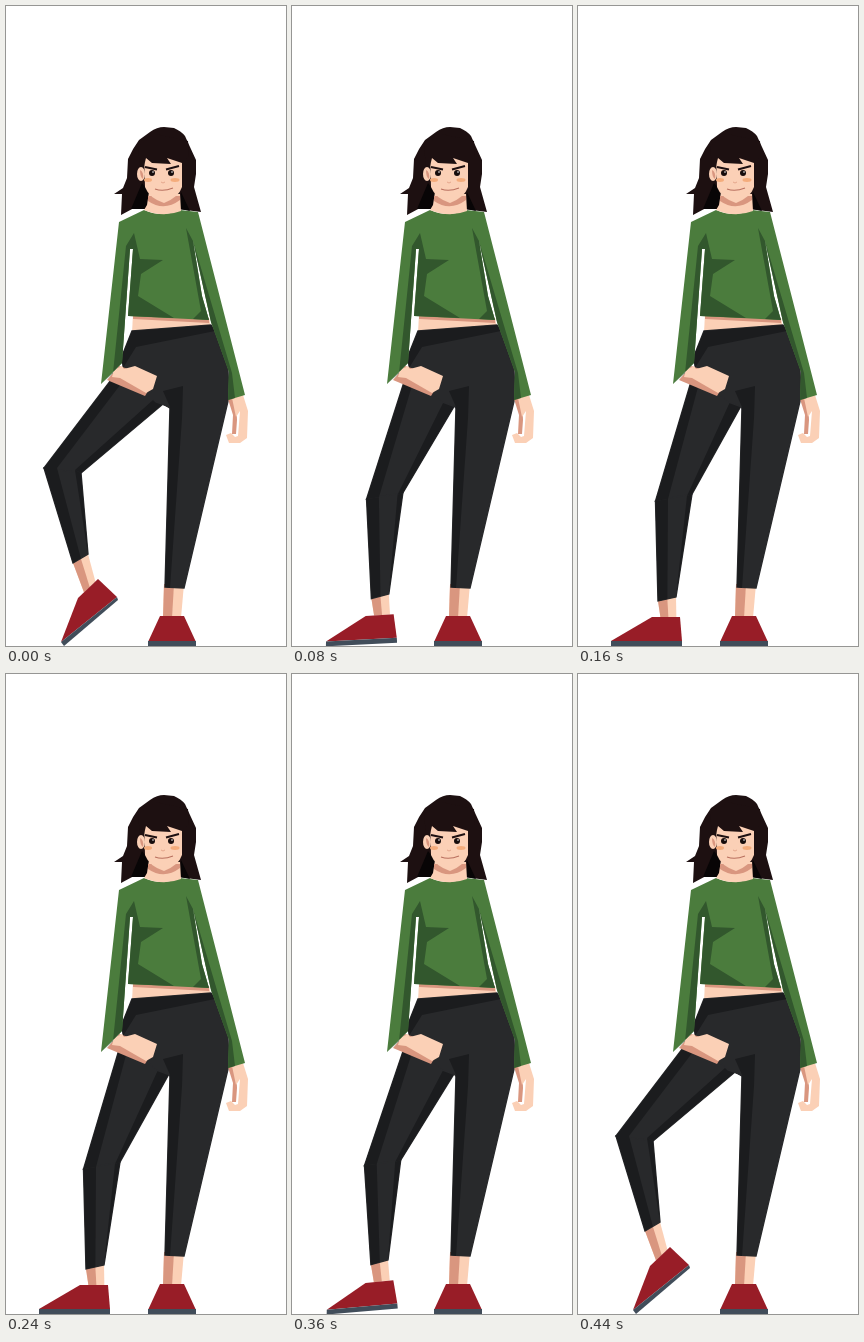
Recreate the animation shown at these times as an HTML page. Size 280 by 640 pixels, loop 480 ms.

```html
<!DOCTYPE html>
<html lang="en">
<head>
<meta charset="utf-8">
<title>Tapping foot</title>
<style>
html, body { margin: 0; width: 100%; height: 100%; overflow: hidden; background: #fff; }
svg { display: block; }
.skin { fill: #fbd0b6; }
.tan { fill: #d9967f; }
.pants { fill: #28292b; stroke: #28292b; stroke-width: 1.4; }
.shade { fill: #1b1c1e; }
.knit { fill: #4b7c3d; }
.fold { fill: #32572d; }
.hair { fill: #1d1011; }
.deep { fill: #080506; }
.shoe { fill: #981d27; }
.sole { fill: #414d5a; }
</style>
</head>
<body>
<svg width="280" height="640" viewBox="0 0 280 640">
  <!-- standing leg -->
  <path class="skin" d="M158 578H178L175 612H157Z"/>
  <path class="tan" d="M158 578H168L166 612H157Z"/>
  <path class="shoe" d="M142 636L154 610H178L190 636Z"/>
  <path class="sole" d="M142 635H190V640H142Z"/>

  <!-- waist -->
  <path class="skin" d="M127 309L203 312L205 321L126 326Z"/>
  <path class="tan" d="M127 309L203 312V317L127 313Z"/>

  <g id="leg"></g>

  <!-- trousers -->
  <path class="pants" d="M126 325L205 319L209 325L222 364L223 391L178 582L159 581L164 401L150 396L118 366L116 350Z"/>
  <path class="shade" d="M126 325L205 319L209 325L130 341L117 362L115 352Z"/>
  <path class="shade" d="M177 380L176 412L164 582L159 581L164 401L157 385Z"/>

  <!-- far hand -->
  <path class="tan" d="M222 393L230 391L231 414L230 428L226 428L227 409Z"/>
  <path class="skin" d="M226 392L237 389L242 405L241 432L234 437L223 437L220 429L225 427L229 431L232 430L234 405L230 411Z"/>

  <!-- near hand -->
  <path class="tan" d="M101 374L113 360L150 372L139 390Z"/>
  <path class="skin" d="M108 364L116 360L118 363L129 360L151 370L147 383L140 387L114 372L106 371Z"/>

  <!-- hair behind the face -->
  <path class="hair" d="M158 121L168 122Q175 125 179 130L184 141L190 154L190 168L188 181L195 206L172 203L140 203L128 202L115 209L116 188L108 188L117 182L121 172L122 153Q127 142 133 134L144 126Q151 121 158 121Z"/>
  <path class="deep" d="M136 177L125 203L140 203L143 186Z"/>
  <path class="deep" d="M175 186L184 205L174 203Z"/>

  <!-- sweater -->
  <path class="knit" d="M138 204Q155 212 174 204L192 206L239 389L222 394L223 366L205 316L187 235L196 290L203 314L122 310L127 243L124 243L116 357L95 378L113 216Z"/>
  <path class="fold" d="M128 227L134 253L157 254L135 268L132 290L168 312L122 310L127 243L124 243L116 357L95 378L107 367L120 240Z"/>
  <path class="fold" d="M180 222L195 305L187 313L203 314L196 290L187 235Z"/>
  <path class="fold" d="M187 235L226 367L229 392L222 394L223 366L205 316Z"/>

  <!-- neck and face -->
  <path class="skin" d="M143 186L174 188L175 205Q157 212 138 204L141 199Z"/>
  <path class="tan" d="M142 190L174 190V194Q158 206 142 195Z"/>
  <ellipse class="skin" cx="135" cy="168" rx="4" ry="7"/>
  <path class="tan" d="M134 164Q138 166 137 173Q134 171 134 164Z"/>
  <path class="skin" d="M138 148H176V181Q173 191 158 197Q143 192 139 181Z"/>
  <path class="hair" d="M134 161L138 160L140 152L146 157L165 158L161 152L176 157L183 150L182 135L150 128L132 140Z"/>
  <path d="M139 161L151 163.5M160 163.5L173 160" fill="none" stroke="#1d1011" stroke-width="2"/>
  <circle cx="146" cy="167" r="3" fill="#160c0c"/>
  <circle cx="165" cy="167" r="3" fill="#160c0c"/>
  <circle cx="147" cy="166" r=".8" fill="#fff"/>
  <circle cx="166" cy="166" r=".8" fill="#fff"/>
  <ellipse cx="142" cy="174" rx="4" ry="1.9" fill="#f4ac7c"/>
  <ellipse cx="169" cy="174" rx="4.5" ry="1.9" fill="#f4ac7c"/>
  <path d="M155 176Q157 178 159 176" fill="none" stroke="#e5a78d" stroke-width="1"/>
  <path d="M149 183Q157 186 167 182" fill="none" stroke="#b9705f" stroke-width="1.1"/>
</svg>
<script>
const LOOP = 480, STEP = 40, LOW = 200, TOP = 440, MID = 0.325;

// Each joint: lifted, partly lowered, planted.
const joints = {
  hip:      [105, 374, 109, 377, 112, 379],
  crotch:   [157, 398, 161, 399, 163, 400],
  knee:     [38, 462, 65, 486, 77.5, 495],
  kneeMid:  [51, 462, 77, 485, 90, 493],
  kneeIn:   [75, 467, 101, 483, 114, 488],
  kneeFold: [69, 464, 95, 484, 109, 490],
  cuff:     [67, 557, 77, 584, 80, 595],
  cuffIn:   [82, 548, 93, 578, 98, 591],
  heel:     [111, 591, 107, 621.5, 104, 635],
  collar:   [92, 573, 100, 599, 102, 611],
  tongue:   [72, 592, 73, 606, 74, 611],
  toe:      [55, 636, 38, 636.5, 33, 635],
  soleToe:  [58, 640, 38, 641, 33, 640],
  soleHeel: [112, 594, 108, 626, 104, 640]
};

const leg = document.getElementById("leg");

function addShape(cls) {
  const p = document.createElementNS("http://www.w3.org/2000/svg", "polygon");
  p.setAttribute("class", cls);
  leg.append(p);
  return p;
}

const shapes = ["skin", "tan", "shoe", "sole", "pants", "pants", "shade", "shade", "shade", "shade"].map(addShape);

function lift(t) {
  return t < LOW ? (1 - t / LOW) ** 5 : Math.min(1, (t - LOW) / (TOP - LOW)) ** 5;
}

// Quadratic through the three positions at lift 1, MID and 0.
function locate(j, s) {
  const a = s * (s - MID) / (1 - MID);
  const b = s * (1 - s) / (MID * (1 - MID));
  const c = (s - 1) * (s - MID) / MID;
  return [0, 1].map(i => a * j[i] + b * j[i + 2] + c * j[i + 4]);
}

const mix = (p, q, k) => [p[0] + (q[0] - p[0]) * k, p[1] + (q[1] - p[1]) * k];

function draw(t) {
  const s = lift(t), p = {};
  for (const name in joints) p[name] = locate(joints[name], s);
  const cuffMid = mix(p.cuff, p.cuffIn, 0.52);
  const ankle = mix(p.tongue, p.collar, 0.3);
  const ankleIn = mix(p.tongue, p.collar, 0.87);
  const ankleMid = mix(ankle, ankleIn, 0.5);
  [
    [p.cuff, p.cuffIn, ankleIn, ankle],
    [p.cuff, cuffMid, ankleMid, ankle],
    [p.toe, p.tongue, p.collar, p.heel],
    [p.toe, p.heel, p.soleHeel, p.soleToe],
    [[118, 360], [177, 380], [164, 402], p.crotch, p.kneeIn, p.knee, p.hip],
    [p.knee, p.kneeIn, p.cuffIn, p.cuff],
    [[118, 360], [124, 366], p.kneeMid, p.knee, p.hip],
    [p.knee, p.kneeMid, cuffMid, p.cuff],
    [[177, 380], [157, 385], p.kneeFold, p.kneeIn, p.crotch, [164, 402]],
    [p.kneeFold, p.kneeIn, p.cuffIn]
  ].forEach((pts, i) => shapes[i].setAttribute("points",
    pts.map(q => q.map(v => v.toFixed(2)).join()).join(" ")));
}

const start = performance.now();

function tick() {
  const t = (performance.now() - start) % LOOP;
  draw(Math.floor(t / STEP) * STEP);
  requestAnimationFrame(tick);
}
tick();
</script>
</body>
</html>
```
